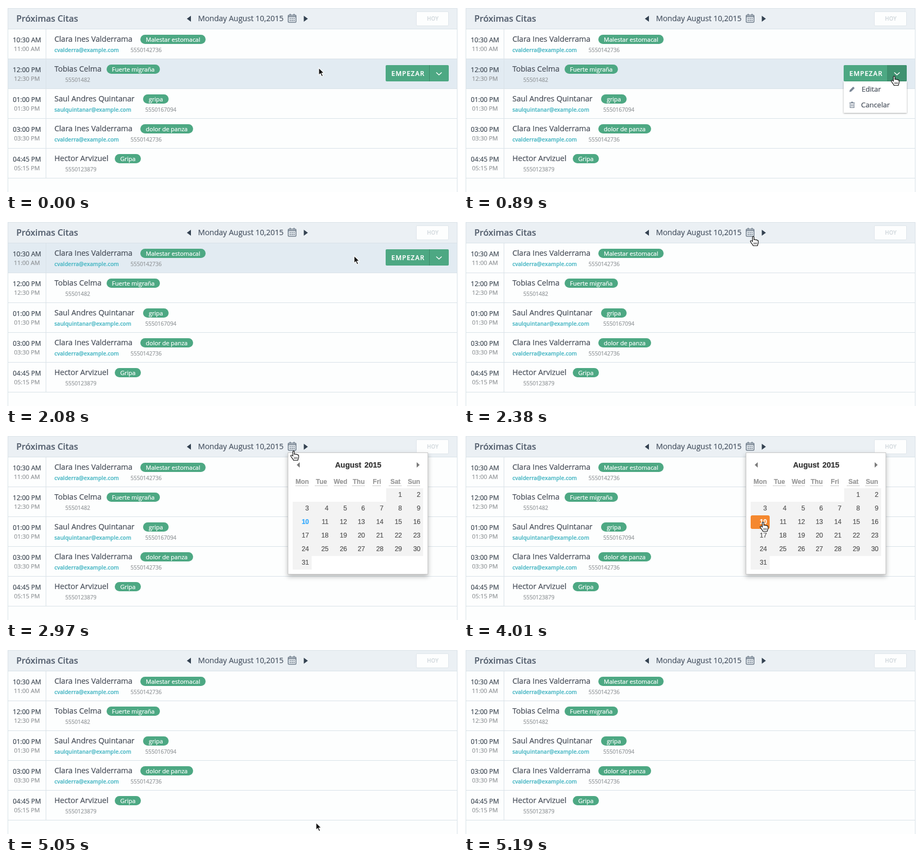
Recreate the animation shown at these times as an HTML page. Size 831 px wide and 343 px high, loop 5.57 s.

```html
<!DOCTYPE html>
<html lang="es">
<head>
<meta charset="utf-8">
<style>
html, body { margin: 0; height: 100%; overflow: hidden; background: #fff; }
svg { display: block; font-family: "Open Sans", sans-serif; cursor: default; }
#calendar { font-family: "Liberation Sans", Arial, sans-serif; }
#popupShadow { filter: drop-shadow(0 4px 4px rgba(0,0,0,.28)); }
#menuShadow { filter: drop-shadow(0 1px 1.5px rgba(0,0,0,.35)); }
</style>
</head>
<body>
<svg id="stage" width="831" height="343" viewBox="0 0 831 343"></svg>
<script>
const LOOP = 5570, TOP = 43, ROW = 55;
const LINE = '#d9e2e8', GREEN = '#4da883', SLATE = '#74818f';

// A hairline stroke gives the slightly heavy text rendering
const text = (x, y, size, fill, str, extra = '') =>
  `<text x="${x}" y="${y}" font-size="${size}" fill="${fill}" stroke="${fill}" stroke-width=".22" ${extra}>${str}</text>`;
const rect = (x, y, w, h, fill, extra = '') =>
  `<rect x="${x}" y="${y}" width="${w}" height="${h}" fill="${fill}" ${extra}/>`;
const path = (d, fill, extra = '') => `<path d="${d}" fill="${fill}" ${extra}/>`;
const group = (id, body) => `<g id="${id}">${body}</g>`;
const mid = 'text-anchor="middle"', semi = 'font-weight="600"', bold = 'font-weight="700"';

// start, end, name, email, phone, phone x, reason, pill x, pill width
const visits = [
  ['10:30 AM', '11:00 AM', 'Clara Ines Valderrama', 'cvalderra@example.com', '5550142736', 229, 'Malestar estomacal', 247, 120],
  ['12:00 PM', '12:30 PM', 'Tobias Celma', '', '55501482', 109, 'Fuerte migraña', 185, 98],
  ['01:00 PM', '01:30 PM', 'Saul Andres Quintanar', 'saulquintanar@example.com', '5550167094', 256, 'gripa', 252, 47],
  ['03:00 PM', '03:30 PM', 'Clara Ines Valderrama', 'cvalderra@example.com', '5550142736', 229, 'dolor de panza', 247, 97],
  ['04:45 PM', '05:15 PM', 'Hector Arvizuel', '', '5550123879', 109, 'Gripa', 200, 48]
];

function visitRow([start, end, name, email, phone, phoneX, reason, pillX, pillW], i) {
  const y = TOP + i * ROW;
  return rect(4, y + 54, 825, 1, LINE) +
    text(38.5, y + 24, 12, '#3e4853', start, mid) +
    text(38.5, y + 40, 11, '#929699', end, mid) +
    text(89, y + 23, 14, '#474d58', name) +
    text(89, y + 42, 10, '#4bb8c5', email, semi) +
    text(phoneX, y + 42, 10, '#94989b', phone) +
    rect(pillX, y + 10, pillW, 17, GREEN, 'rx="8.5"') +
    text(pillX + pillW / 2, y + 23, 11, '#fff', reason, mid);
}

function header() {
  let dots = '';
  for (let i = 0; i < 6; i++) dots += rect(521.5 + i % 3 * 3.5, 22.5 + (i > 2 ? 3.5 : 0), 2.2, 2, SLATE);
  return rect(3.5, 4.5, 826, 38, '#ebf0f4', `stroke="${LINE}"`) +
    path('M340 18V29L332.5 23.5Z', '#344251') +
    text(19, 29, 16, '#566170', 'Próximas Citas', semi) +
    text(353, 28, 14, '#4b5665', 'Monday August 10,2015') +
    rect(518.8, 16.8, 14.4, 13.4, 'none', `rx="2" stroke="${SLATE}" stroke-width="1.6"`) +
    rect(519, 18.5, 14, 2, SLATE) + rect(521.5, 14.5, 2, 3, SLATE) + rect(528.5, 14.5, 2, 3, SLATE) + dots +
    path('M547.5 18V29L555 23.5Z', '#344251') +
    rect(754.5, 10.5, 59, 26, '#fdfefe', 'rx="1.5" stroke="#dfe6eb"') +
    text(784.5, 27, 10, '#d3d9de', 'HOY', mid + ' ' + semi);
}

// Drawn for the first row, then shifted down
const button = rect(698, 54, 116, 30, GREEN, 'rx="2"') +
  rect(778, 54, 36, 30, '#3f9270', 'id="caret" rx="2"') +
  rect(778, 54, 1, 30, '#3d8a69') +
  text(708.5, 73.5, 12, '#fff', 'EMPEZAR', semi + ' letter-spacing="1"') +
  path('M791 67.5L796 72L801 67.5', 'none', 'stroke="#fff" stroke-width="1.5"');

const menu = rect(698, 139, 116, 58, '#fff', 'id="menuShadow"') +
  path('M708.5 158.5L709.3 155L715.5 148.8L718.2 151.5L712 157.7Z', '#7b8797') +
  text(731, 158, 13, '#474f5b', 'Editar') +
  rect(708.5, 178, 10, 1.4, '#7b8797') + rect(711.5, 176.6, 4, 1.4, '#7b8797') +
  path('M709.9 180V187.3H717.1V180M712.3 181V185.5M714.8 181V185.5', 'none', 'stroke="#7b8797" stroke-width="1.2"') +
  text(730, 187, 13, '#474f5b', 'Cancelar');

const edges = [527, 562, 598, 632, 665, 699, 733, 767];
const DAYS_TOP = 100, CELL = 25, FIRST = 5;

function calendar() {
  let out = rect(518.5, 34.5, 257, 224, '#fff', 'id="popupShadow" stroke="#c8c8c8"') +
    path('M540 52V62L534.5 57Z', '#7b7b7b') + path('M755 52V62L760.5 57Z', '#7b7b7b') +
    text(605, 62, 14, '#333', 'August', bold) + text(659, 62, 14, '#333', '2015', bold);
  ['Mon', 'Tue', 'Wed', 'Thu', 'Fri', 'Sat', 'Sun'].forEach((name, i) => {
    const x = (edges[i] + edges[i + 1]) / 2, half = name === 'Fri' ? 8 : 12;
    out += text(x, 92, 12, '#999', name, mid + ' ' + bold) +
      path(`M${x - half} 95.5H${x + half}`, 'none', 'stroke="#999" stroke-dasharray="1 1"');
  });
  for (let day = 1; day <= 31; day++) {
    const cell = day + FIRST - 1, col = cell % 7, y = DAYS_TOP + Math.floor(cell / 7) * CELL;
    out += `<g class="day">` + rect(edges[col], y, edges[col + 1] - edges[col], CELL, '#f3f3f3') +
      text(edges[col + 1] - 5, y + 16, 12, '#555', day, 'text-anchor="end" ' + (day === 10 ? bold : '')) + '</g>';
  }
  return out;
}

const arrow = path('M0 0V13.5L3.1 10.7L5.4 16L7.8 15L5.5 9.8H9.8Z', '#111', 'stroke="#fff" stroke-width="1.1"');
const hand = path('M-1.6 8.5V.8C-1.6-1 1.2-1 1.2 .8V6C1.2 4.6 4 4.6 4 6.2C4 5 6.6 5 6.6 6.8C6.6 6 9 6 9 8V11C9 13 7.8 14 7.5 16.5H-.5C-.8 14.5-2.5 13.5-4 11C-5.5 8.8-6 7.8-5 7.2C-3.8 6.5-2.4 7.8-1.6 8.5Z',
  '#fff', 'stroke="#111" stroke-width="1.2"') + path('M1.2 10.5V14M3.6 10.5V14M6 10.5V14', 'none', 'stroke="#111" stroke-width=".9"');

document.getElementById('stage').innerHTML =
  rect(0, 0, 831, 343, '#fff') + rect(4, 43, 825, 300, '#fdfefe') + header() +
  rect(4, TOP, 825, 54, '#e2ebf2', 'id="hover"') +
  visits.map(visitRow).join('') +
  rect(73, 43, 1, 275, LINE) + rect(3, 43, 1, 300, LINE) + rect(829, 43, 1, 300, LINE) +
  group('button', button) + group('menu', menu) + group('calendar', calendar()) +
  group('cursor', group('arrow', arrow) + group('hand', hand));

const el = id => document.getElementById(id);
const show = (id, on) => el(id).style.display = on ? '' : 'none';
const move = (id, x, y) => el(id).setAttribute('transform', `translate(${x} ${y})`);
const days = [...document.querySelectorAll('.day')];

// time, pointer x, pointer y, open panel
const steps = [
  [0, 575, 114], [150, 590, 118], [300, 650, 126], [450, 730, 131], [600, 778, 132], [740, 791, 130],
  [890, 791, 130, 'menu'],
  [1640, 791, 128], [1780, 762, 116], [1930, 721, 104], [2080, 640, 66], [2230, 562, 24],
  [2380, 532, 31], [2530, 530, 31], [2680, 529, 32],
  [2970, 529, 32, 'calendar'], [3420, 532, 52, 'calendar'], [3570, 538, 90, 'calendar'],
  [3720, 545, 130, 'calendar'], [3860, 549, 155, 'calendar'], [4010, 550, 163, 'calendar'],
  [4460, 550, 163], [4600, 552, 160], [4750, 553, 158], [4900, 560, 235], [5050, 570, 322],
  [5190, -50, -50]
];

function render(t) {
  const [, x, y, open] = steps.findLast(s => s[0] <= t);
  const picking = open === 'calendar';
  const row = Math.floor((y - TOP) / ROW), inRow = !picking && row >= 0 && row < visits.length;
  const top = row * ROW;
  const onButton = inRow && x >= 698 && x < 814 && y >= top + 54 && y < top + 84;
  const onIcon = y > 10 && y < 34 && x > 516 && x < 536;
  const onDays = picking && y >= DAYS_TOP;

  show('hover', inRow);
  show('button', inRow);
  if (inRow) {
    move('hover', 0, top);
    move('button', 0, top);
  }
  const focused = t >= 890 && t < 2080;
  el('caret').setAttribute('opacity', onButton && x >= 778 ? 1 : focused ? .45 : 0);
  show('menu', open === 'menu');
  show('calendar', picking);

  const col = edges.findIndex(e => e > x) - 1;
  const hovered = onDays ? Math.floor((y - DAYS_TOP) / CELL) * 7 + col - FIRST + 1 : 0;
  days.forEach((cell, i) => {
    const on = i + 1 === hovered, [box, label] = cell.children;
    const ink = on ? '#fff' : i === 9 ? '#3af' : '#555';
    box.setAttribute('fill', on ? '#f5882f' : '#f3f3f3');
    box.setAttribute('rx', on ? 3 : 0);
    label.setAttribute('fill', ink);
    label.setAttribute('stroke', ink);
  });

  const pointing = onButton || onIcon || onDays;
  show('hand', pointing);
  show('arrow', !pointing);
  move('cursor', x, y);
}

const begin = performance.now();
function tick() {
  render((performance.now() - begin) % LOOP);
  requestAnimationFrame(tick);
}
tick();
</script>
</body>
</html>
```
